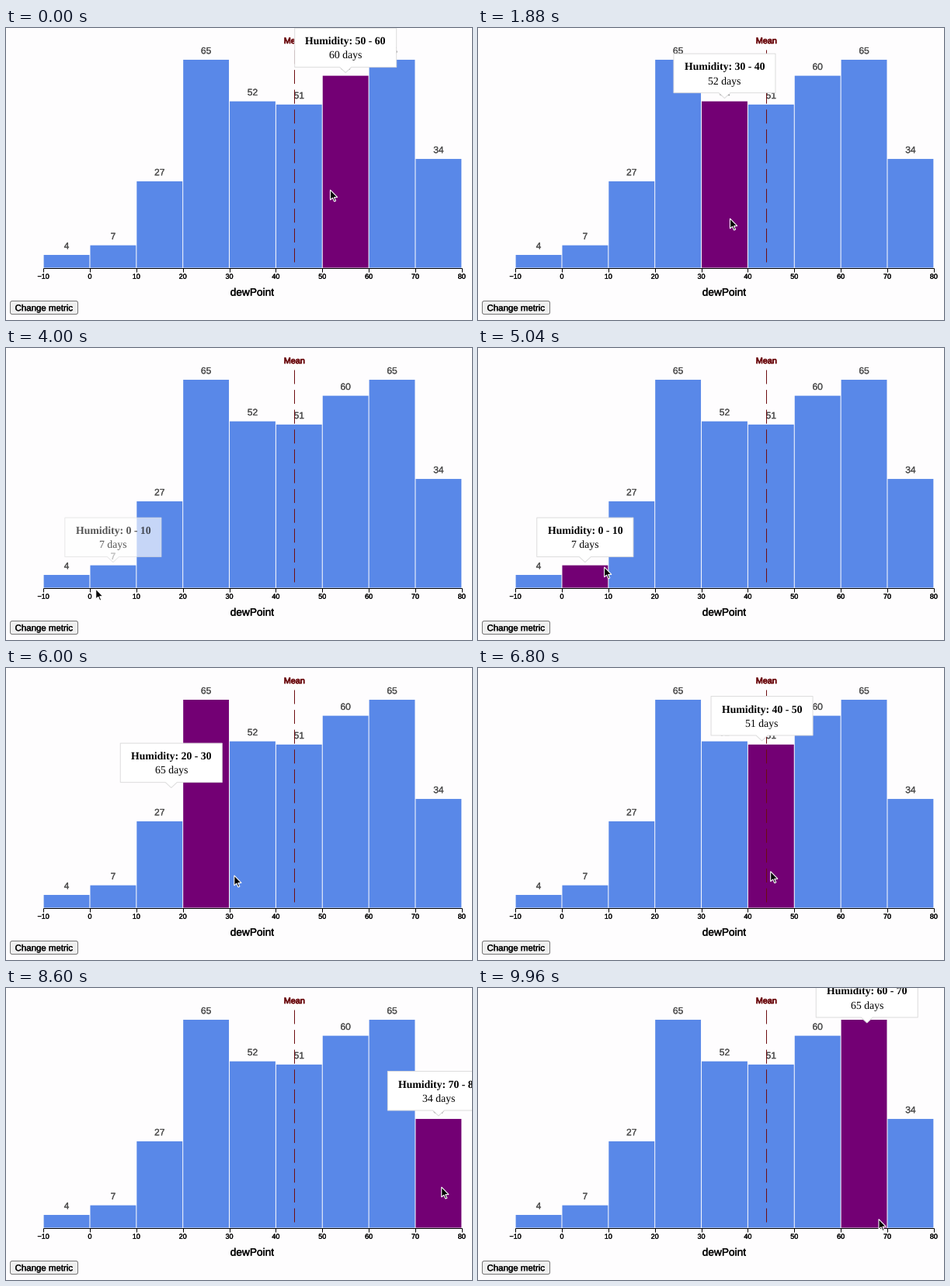
A matplotlib script for the animation above (10000 ms loop, 600 by 377 pixels).

```python
import matplotlib.pyplot as plt
import numpy as np
from matplotlib.animation import FuncAnimation
from matplotlib.patches import FancyBboxPatch, Polygon, Rectangle
from matplotlib.patheffects import withStroke

W, H, DPI = 600, 377, 100
STEP, LOOP = 40, 10000
PX = 72 / DPI
SANS, SERIF = "Liberation Sans", "Liberation Serif"
BLUE, PURPLE, MAROON = "#5988e8", "#730074", "#6d0c10"

COUNTS = [4, 7, 27, 65, 52, 51, 60, 65, 34]
LEFT, BIN, BASE, UNIT = 48.1, 59.86, 309.5, 4.131
FADE, LAG, TICK = 200, 55, 4

# Pointer strokes: start ms, end ms, and where the tip comes to rest.
HOME = (417.5, 209)
STROKES = [
    (320, 720, 384, 226),
    (880, 1520, 324.5, 246),
    (1880, 2120, 196, 312),
    (2330, 2460, 177, 300),
    (2450, 2640, 156, 256),
    (2880, 3480, 140, 305.5),
    (3800, 4020, 115.5, 311.2),
    (4040, 4520, 78, 303),
    (4680, 5560, 208, 272),
    (5890, 6140, 333, 266),
    (6560, 6960, 385, 262),
    (7160, 7560, 433, 257.5),
    (7760, 8640, 561, 257),
    (9520, 9960, 516, 298.5),
]

ARROW = np.array([
    (0, 0), (0, 13), (3, 10.2), (5.1, 15), (7.1, 14.2), (5, 9.6), (9.3, 9.6),
])


def top(i):
    return BASE - COUNTS[i] * UNIT


def center(i):
    return LEFT + (i + 0.5) * BIN


def pointer(t):
    pos = np.array(HOME)
    for start, end, x, y in STROKES:
        u = np.clip((t - start) / (end - start), 0, 1)
        pos = pos + (np.array((x, y)) - pos) * (1 - (1 - u) ** 2)
    return pos


def bar_under(x, y):
    i = int((x - LEFT) // BIN)
    return i if 0 <= i < len(COUNTS) and top(i) <= y <= BASE else None


# CSS ease-out: cubic-bezier(0, 0, .58, 1)
s = np.linspace(0, 1, 200)
EASE_X = 1.74 * (1 - s) * s**2 + s**3
EASE_Y = 3 * (1 - s) * s**2 + s**3


class Transition:
    def __init__(self, value):
        self.start = self.goal = np.asarray(value, float)
        self.began = -FADE

    def at(self, t):
        u = (t - self.began) / FADE
        return self.start + (self.goal - self.start) * np.interp(u, EASE_X, EASE_Y)

    def aim(self, t, goal):
        self.start, self.goal, self.began = self.at(t), np.asarray(goal, float), t


def simulate():
    """Per frame: hovered bar, labelled bar, tooltip anchor and opacity."""
    bar = shown = bar_under(*HOME)
    anchor = Transition((center(bar), top(bar)))
    alpha = Transition(1)
    states = []
    for t in range(0, LOOP, TICK):
        now = bar_under(*pointer(t - LAG))
        if now != bar:
            if now is not None and now != shown:
                anchor.aim(t, (center(now), top(now)))
                shown = now
            if None in (now, bar):
                alpha.aim(t, now is not None)
            bar = now
        if t % STEP == 0:
            states.append((bar, shown, anchor.at(t), float(alpha.at(t))))
    return states


STATES = simulate()

plt.rcParams["text.hinting"] = "none"
fig = plt.figure(figsize=(W / DPI, H / DPI), dpi=DPI, facecolor="#fefdfe")
ax = fig.add_axes([0, 0, 1, 1])
ax.set_xlim(0, W)
ax.set_ylim(H, 0)
ax.axis("off")


def label(x, y, text, size, color="black", font=SANS, stroke=0.2, **kw):
    item = ax.text(x, y, text, fontsize=size * PX, color=color, family=font,
                   ha="center", va="baseline", **kw)
    if stroke:
        item.set_path_effects([withStroke(linewidth=stroke, foreground=color)])
    return item


def line(xs, ys, color="black", **kw):
    ax.plot(xs, ys, color=color, lw=PX, solid_capstyle="butt",
            dash_capstyle="butt", zorder=3, **kw)


bars = []
for i, n in enumerate(COUNTS):
    rect = Rectangle((LEFT + i * BIN + 0.5, top(i)), BIN - 1, n * UNIT,
                     fc=BLUE, lw=0, snap=False, zorder=1)
    bars.append(ax.add_patch(rect))
    label(center(i), top(i) - 7.7, str(n), 12, "#505050", zorder=2)

# Mean marker
line([371, 371], [28, BASE], MAROON, ls=(0, (18, 7.6)))
label(371.3, 20, "Mean", 10.8, MAROON, stroke=0.6, zorder=3)

# Axis
line([LEFT, LEFT + 9 * BIN], [310, 310])
for k in range(10):
    x = LEFT + k * BIN
    line([x, x], [310, 315])
    label(x, 323.7, str(10 * k - 10).replace("-", "\u2212"), 9, zorder=3)
label(317, 345.6, "dewPoint", 13.7)

# Button
ax.add_patch(FancyBboxPatch((5.5, 352.5), 87, 17,
                            boxstyle="round,pad=0,rounding_size=2.5",
                            fc="#efefef", ec="#767676", lw=PX))
label(49, 365.2, "Change metric", 11.45)

# Tooltip and pointer
box = ax.add_patch(Polygon(ARROW, closed=True, lw=PX, zorder=5))
title = label(0, 0, "", 13.7, font=SERIF, stroke=0, weight="bold", zorder=6)
value = label(0, 0, "", 13.7, font=SERIF, stroke=0, zorder=6)
cursor = ax.add_patch(Polygon(ARROW, closed=True, fc="black", ec="white",
                              lw=1.1 * PX, joinstyle="miter", zorder=8))


def update(frame):
    bar, shown, (x, y), alpha = STATES[frame]
    for i, rect in enumerate(bars):
        rect.set_facecolor(PURPLE if i == bar else BLUE)

    low = 10 * shown - 10
    title.set_text(f"Humidity: {low} - {low + 10}")
    value.set_text(f"{COUNTS[shown]} days")
    half = (title.get_window_extent().width + 27.5) / 2
    bottom = y - 11
    roof = bottom - 50.5
    box.set_xy([(x - half, roof), (x + half, roof), (x + half, bottom),
                (x + 7.5, bottom), (x, bottom + 7), (x - 7.5, bottom),
                (x - half, bottom)])
    box.set_facecolor((1, 1, 1, alpha))
    box.set_edgecolor((0.867, 0.867, 0.867, alpha))
    title.set_position((x, roof + 21))
    value.set_position((x, roof + 39.3))
    for part in (title, value):
        part.set_alpha(alpha)

    cursor.set_xy(ARROW + pointer(frame * STEP))
    return [*bars, box, title, value, cursor]


anim = FuncAnimation(fig, update, frames=LOOP // STEP, interval=STEP,
                     init_func=lambda: update(0), repeat=True, repeat_delay=0)
plt.show()
```
